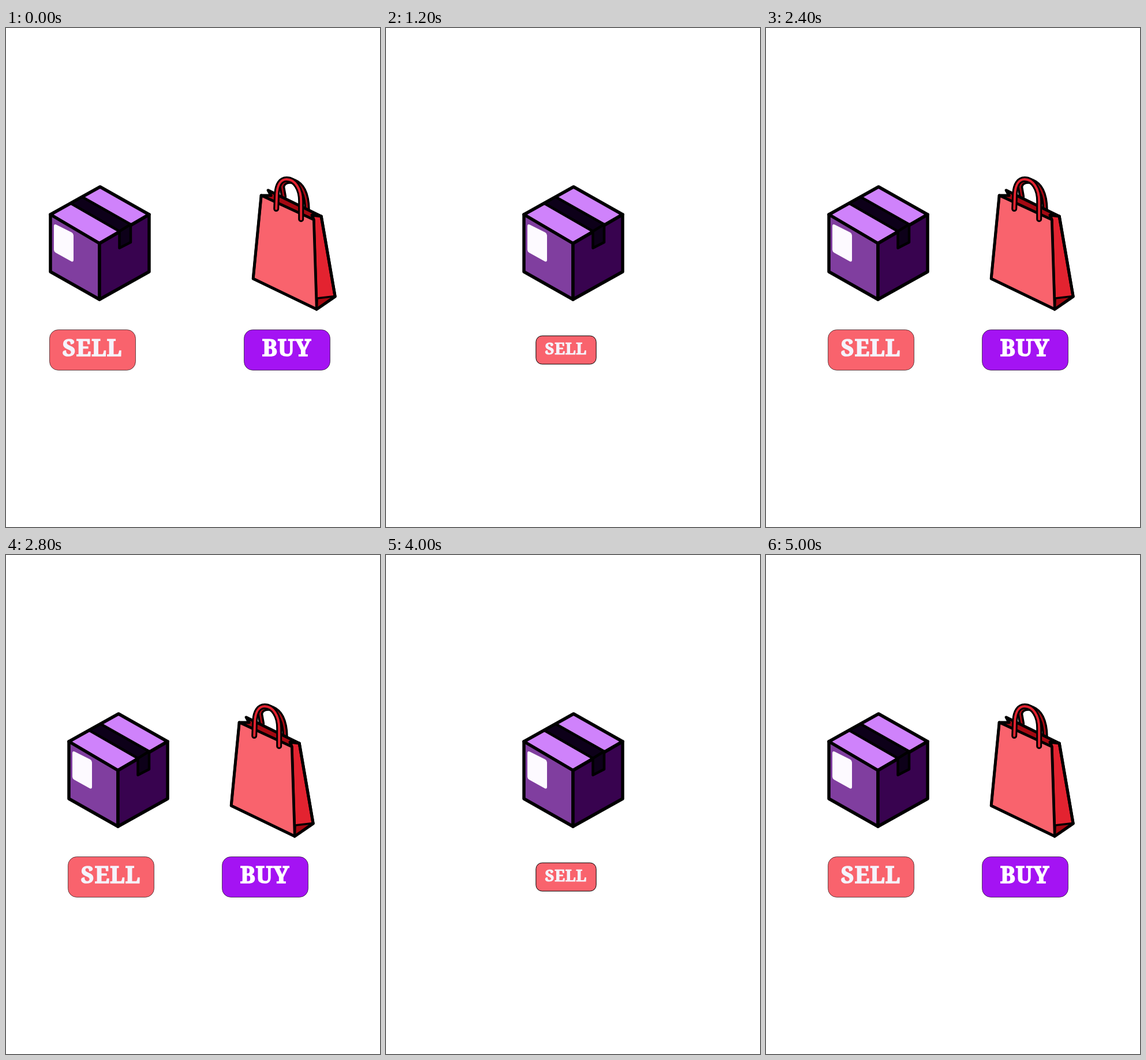
Animation, 648 px wide and 864 px high, one loop 5200 ms. Source, as an HTML page:

```html
<!DOCTYPE html>
<html lang="en">
<head>
<meta charset="utf-8">
<title>Sell and buy</title>
<style>
  html, body { margin: 0; width: 100%; height: 100%; overflow: hidden; background: #fff; }
  svg { position: absolute; left: 0; top: 0; width: 648px; height: 864px; }
  .art { stroke: #000; stroke-width: 5.5; stroke-linejoin: round; stroke-linecap: round; }
  .plain { stroke: none; }
  .line { fill: none; }

  .box { animation: slide-box 2.6s step-end infinite, show-box 5.2s step-end infinite; }
  .bag { z-index: 1; animation: slide-bag 2.6s step-end infinite, show-bag 5.2s step-end infinite; }
  .button { animation: press 2.6s step-end infinite; stroke: #0009; stroke-width: 1; }
  .box .button { transform-origin: 150px 557.5px; }
  .bag .button { transform-origin: 487px 557.5px; }
  .button rect { vector-effect: non-scaling-stroke; }
  .button text {
    font: 700 39px "Noto Serif", serif; letter-spacing: 1px; text-anchor: middle;
    stroke-width: 1.6; stroke: currentColor; fill: currentColor;
  }

  /* 13 equal steps: approach, meet, part again */
  @keyframes slide-box {
    0%, 100% { transform: none; }
    7.69%, 92.3% { transform: translateX(32px); }
    15.38%, 84.61% { transform: translateX(75px); }
    23.07%, 76.92% { transform: translateX(118px); }
    30.76% { transform: translateX(162px); }
  }
  @keyframes slide-bag {
    0%, 100% { transform: none; }
    7.69%, 92.3% { transform: translateX(-38px); }
    15.38%, 84.61% { transform: translateX(-86px); }
    23.07%, 76.92% { transform: translateX(-131px); }
    30.76% { transform: translateX(-175px); }
  }
  @keyframes press {
    0%, 69.23%, 100% { transform: none; stroke: #0009; }
    38.46%, 61.53% { transform: scale(.85); stroke: #000c; }
    46.15% { transform: scale(.7); stroke: #000; }
  }

  /* the item that stays alone is also the one in front */
  @keyframes show-box {
    0%, 76.92%, 100% { visibility: visible; z-index: 2; }
    26.92%, 65.38% { visibility: hidden; z-index: 0; }
    38.46% { visibility: visible; z-index: 0; }
  }
  @keyframes show-bag {
    0%, 26.92%, 88.46%, 100% { visibility: visible; }
    15.38%, 76.92% { visibility: hidden; }
  }
</style>
</head>
<body>
<svg class="box" viewBox="0 0 648 864">
  <g class="art">
    <path fill="#cf82fb" d="M163 275L248 323L162 373L77 323Z"/>
    <path fill="#803e9f" d="M77 323L162 373V470L77 422Z"/>
    <path fill="#38034f" d="M162 373L248 323V422L162 470Z"/>
    <path fill="#0d0019" stroke-width="4.5" d="M112 303.5L132 292.5L216 340V371L196.5 381V352Z"/>
    <path class="line" stroke-width="4.5" d="M196.5 352L216 340"/>
    <path class="plain" fill="#fdfaff" d="M87 340.5L114 354Q117 356 117 359V401Q117 406 113 404L86 389Q83 387 83 384V343Q83 339 87 340.5Z"/>
  </g>
  <g class="button">
    <rect x="75.5" y="522.5" width="149" height="70" rx="15" fill="#f9636d"/>
    <text x="149.5" y="567.5" color="#f5f3fc">SELL</text>
  </g>
</svg>

<svg class="bag" viewBox="0 0 648 864">
  <defs>
    <path id="back-handle" d="M482 292L479 275C481 265 492 263 500 266C515 272 522 290 522.5 314"/>
    <path id="front-handle" d="M469 313L470 287C471 271 477 262 487 262C502 262 512 279 512 300V331"/>
  </defs>
  <g class="art" transform="translate(-.8)">
    <use href="#back-handle" class="line" stroke-width="10"/>
    <use href="#back-handle" class="line" stroke="#a50912" stroke-width="3"/>
    <g stroke-width="5">
      <path fill="#a50912" d="M443 290L460 290L455 281L467 287L547 326L531 324L534 332Z"/>
      <path fill="#e32330" d="M534 332L531 324L547 326L571 465L539 487Z"/>
      <path fill="#a50912" stroke-width="3.5" d="M540 468L570 464.5L539 487Z"/>
      <path fill="#f9636d" stroke-width="4.5" d="M443 290L534 332L539 487L429 434Z"/>
      <path class="line" d="M443 290L429 434L539 487L571 465L547 326"/>
    </g>
    <use href="#front-handle" class="line" stroke-width="10"/>
    <use href="#front-handle" class="line" stroke="#e32330" stroke-width="4"/>
  </g>
  <g class="button">
    <rect x="412.5" y="522.5" width="149" height="70" rx="15" fill="#a413f3"/>
    <text x="486.5" y="567.5" color="#fff">BUY</text>
  </g>
</svg>
</body>
</html>
```
